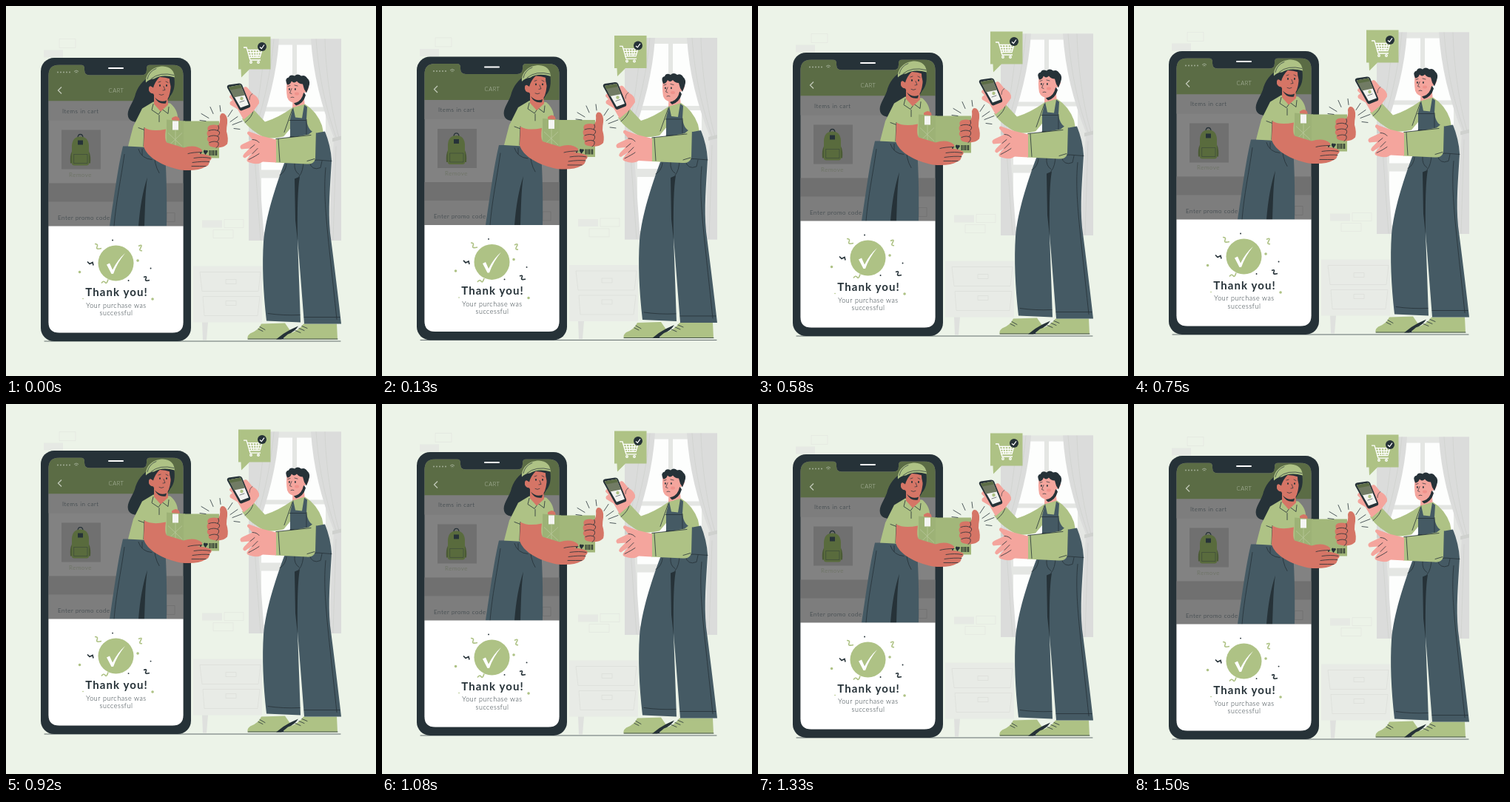
An HTML page that plays this animation: 500 px wide and 500 px high, repeating every 1540 ms.

```html
<!DOCTYPE html>
<html lang="en">
<head>
<meta charset="utf-8">
<title>Purchase complete</title>
<style>
  html, body { margin: 0; width: 100%; height: 100%; overflow: hidden; background: #ecf3e8; }
  svg { display: block; width: 100%; height: 100%; font-family: Lato, sans-serif; font-weight: 300; }
  .green { fill: #aec285; }
  .dark { fill: #263238; }
  .denim { fill: #455a64; }
  .coral { fill: #d57566; }
  .pink { fill: #f4a59d; }
  .white { fill: #fff; }
  .line { fill: none; stroke: #263238; stroke-width: .8; stroke-linecap: round; stroke-linejoin: round; }
  .faint { fill: none; stroke: #dcdfda; stroke-width: .8; }
  .pale { fill: #e6e9e4; }
  text { letter-spacing: .55px; fill: #263238; }
  .mid { text-anchor: middle; }
</style>
</head>
<body>
<svg viewBox="0 0 500 500">
  <defs>
    <clipPath id="screen">
      <path d="M72 80H101Q106 80 106 85V87Q106 94 113 94H183Q190 94 190 87V85Q190 80 195 80H225Q239.500 80 239.500 94V428Q239.500 442 225 442H72Q57.500 442 57.500 428V94Q57.500 80 72 80Z"/>
    </clipPath>
  </defs>
  <g id="scene">
    <g id="wall">
      <path class="pale" d="M51 60H77V70H51ZM265 290H292V300H265Z"/>
      <path class="faint" d="M72 45H94V57H72ZM295 289H321V300H295ZM280 303H307V314H280Z" opacity=".55"/>
    </g>

    <g id="window">
      <path fill="#e4e6e3" d="M328 45H453V317.500H328Z"/>
      <path fill="#fdfefd" d="M366 53H387V137H345V110ZM393 53H414L433 110V137H393ZM345 143H387V222H345ZM393 143H432V222H393ZM345 233H432V306H345Z"/>
      <path fill="#dbdcdb" d="M328 45H369C366 92 354 136 339 178L349 317.500H328ZM453 45H412C415 92 426 136 443 178L436 317.500H453Z"/>
      <path class="faint" style="stroke:#d0d2cf" d="M362 45C357 100 345 145 333 178M350 45C347 95 338 150 331 178M335 190L344 317M419 45C423 100 433 140 446 178M431 45C432 90 440 145 450 178M446 190L442 317"/>
      <path fill="#cfd1ce" d="M328 176L340 179V184L328 181ZM453 176L441 179V184L453 181Z"/>
    </g>

    <g id="cabinet">
      <path fill="#e8ebe6" d="M253 352H346V428H253Z"/>
      <path fill="#dfe1de" d="M265 428H273L271 452H266Z"/>
      <path class="faint" d="M262 360H344L341 386H265ZM266 393H343L340 419H268ZM297 370H311V376H297ZM297 399H311V405H297Z"/>
    </g>

    <path class="line" d="M52 453.500H452" style="stroke-width:.7"/>

    <g id="phone">
      <rect class="dark" x="47" y="70.500" width="203" height="383" rx="18"/>
      <g clip-path="url(#screen)">
        <path fill="#828282" d="M57 79H240V443H57Z"/>
        <path fill="#5b6c45" d="M57 79H240V129H57Z"/>
        <path fill="#7d7d7d" d="M57 129H240V155H57ZM57 265H240V298H57Z"/>
        <path fill="#707070" d="M57 240H240V265H57ZM75 168H128V221H75Z"/>
      </g>
      <path d="M139 84.500H158" stroke="#fff" stroke-width="2" stroke-linecap="round"/>
      <g fill="none" stroke="#a1ac95">
        <path d="M70 90H87" stroke-width="2" stroke-linecap="round" stroke-dasharray="0 4"/>
        <path d="M92 89Q95 86 98 89M93.500 90.500Q95 89 96.500 90.500M95 92V92.200"/>
        <path d="M75 110L70.500 114.500L75 119" stroke="#c0c8b7" stroke-width="1.300"/>
        <path d="M217 280H228V292H217Z" stroke="#6f6f6f" stroke-width=".7"/>
      </g>
      <text class="mid" x="149" y="117" font-size="7.500" style="fill:#b9c2ae">CART</text>
      <g font-size="8">
        <text x="76" y="145">Items in cart</text>
        <text x="70" y="289.500">Enter promo code</text>
        <text x="85" y="231" style="fill:#626b55">Remove</text>
      </g>
      <g id="backpack">
        <path class="line" d="M97 179Q97 174 100.500 174Q104 174 104 179" style="stroke-width:1.300"/>
        <path fill="#4b5b35" d="M87 213Q86 203 89 197H112Q115 203 114 213Z"/>
        <path fill="#596b3d" d="M89 213V189Q90 177 100.500 177Q111 177 112 189V213Q112 216 109 216H92Q89 216 89 213Z"/>
        <path class="line" d="M92 201H110V213H92Z" style="stroke-width:.4"/>
        <path class="dark" d="M97 182H104V188H97Z"/>
      </g>
    </g>

    <g id="courier">
      <path class="dark" d="M197 95C184 100 177 111 174 123C170 134 163 141 165 150C168 160 186 160 193 148L212 139L222 122Q230 113 227 94Z"/>
      <path class="denim" d="M158 190H214Q218 232 217 298H140C147 252 151 220 158 190Z"/>
      <path class="dark" d="M191 232C188 252 188 274 187 298H179C181 272 185 250 191 232Z"/>
      <path class="line" d="M160 201C155 237 149 262 146 298M179 194Q183 207 197 208M200 195Q200 215 207 226M184 194V202"/>
      <path class="green" d="M184 139L199 130L222 132Q234 142 232 158L219 158L216 193L165 190Q168 178 172 163Z"/>
      <path class="line" d="M187 165L186 190M199 133L197 141L206 147L211 140L219 146L220 137M207 148V157M179 165L187 168"/>
      <path class="coral" d="M200 118H218L219 134L209 143L200 133Z"/>
      <path class="dark" d="M201 124Q209 132 217 128L216 132Q206 134 201 124Z"/>
      <path class="coral" d="M196 99Q208 94 222 99Q224 111 220 123Q217 130 210 128Q202 126 199 119Q192 118 193 111Q194 107 198 110Z"/>
      <path class="dark" d="M194 97L208 96Q201 103 199 111L195 108ZM219 95H226L226 113Q221 109 221 99Z"/>
      <path class="green" d="M189 104C188 91 199 82 212 82Q227 83 228 97Q211 92 200 99Q194 99 189 104Z"/>
      <path class="line" d="M196 99Q208 89 227 94M203 85Q193 89 191 99M206 103.500L209 102.500M216 102.500L219 104M213 109L215 114L212 114.500M207 120Q210 122 213 120" style="stroke-width:.7"/>
      <path class="dark" d="M207 108a1 1.400 0 1 0 2 0a1 1.400 0 1 0-2 0M216 108a1 1.400 0 1 0 2 0a1 1.400 0 1 0-2 0"/>
    </g>

    <g id="receipt">
      <path class="white" d="M57.500 298H239.500V428Q239.500 442 225 442H72Q57.500 442 57.500 428Z"/>
      <circle class="green" cx="148.500" cy="348" r="24"/>
      <path class="white" d="M136 350L140 348L144 357Q151 343 161 334.500Q150 348 145 362.500H142.500Z"/>
      <g fill="none" stroke="#aec285" stroke-width="1.600">
        <path d="M120 322Q125 322 123 326T129 328M129 375Q132 371 134 374T138 370M179 325Q185 322 182 327T184 331"/>
        <path d="M110 346L113 349L117 347L118 351M186 367Q191 365 189 369T194 371" stroke="#263238"/>
      </g>
      <path class="line" d="M144 317h.1M195.500 355h.1M165.500 371.500h.1" style="stroke-width:1.800"/>
      <path class="line" d="M99.500 360h.1M178 344.500h.1M198 396.500h.1" style="stroke:#aec285;stroke-width:3.500"/>
      <path class="line" d="M104 396h.1" style="stroke:#aec285;stroke-width:1.600"/>
      <text class="mid" x="149.500" y="392.500" font-size="15" font-weight="700" style="letter-spacing:1.100px">Thank you!</text>
      <g class="mid" font-size="9">
        <text x="149" y="408">Your purchase was</text>
        <text x="149" y="418.500">successful</text>
      </g>
    </g>

    <g id="parcel">
      <path class="coral" d="M224 152Q230 147 234 152L235 157H224Z"/>
      <path fill="#9db276" d="M217 154L242 156V205L217 187Z"/>
      <path fill="#a2b77a" d="M240 156H288V206H240Z"/>
      <path fill="#f4f5f2" d="M225 156H233V168H225Z"/>
      <path d="M219 172L238 190M238 172L219 190M229 168V190" fill="none" stroke="#bccaa0" stroke-width=".7"/>
      <path class="dark" d="M261 196H265L264 199V202H266V203H260V202H262V199ZM267 196Q269 194 270 196Q272 194 273 197L270 201V203H269V201L267 198Z"/>
      <path d="M274.500 199H286" fill="none" stroke="#3e4a3b" stroke-width="7" stroke-dasharray="2 .7 1 .6"/>
      <path class="coral" d="M187 165Q197 171 216 167Q214 180 217 185L240 192Q256 187 265 195L265 198L259 200Q269 200 277 204Q279 207 275 210Q275 216 269 218Q259 224 236 222C212 217 190 205 186 190Z"/>
      <path class="line" d="M246 200Q253 198 265 198M254 206Q266 204 276 206M252 212Q266 210 275 211M251 217Q262 217 270 217"/>
      <path class="coral" d="M275 162Q281 160 287 162Q290 157 289 150Q290 144 295 146Q300 150 299 159Q298 164 298 170Q301 180 299 187Q292 194 279 191Q272 190 274 184Q270 181 273 177Q270 172 273 169Q271 164 275 162Z"/>
      <path class="line" d="M274 169Q282 166 288 170Q290 173 286 176M274 177Q281 174 287 177Q289 181 285 184M275 185Q282 182 287 185Q288 190 284 192M287 162Q289 166 286 169"/>
      <path class="line" d="M289 135L290 143M276 137L280 146M264 146L274 152M262 155L270 156M306 141L300 150M313 150L303 157M319 156L306 161M308 166L316 167"/>
    </g>

    <g id="bubble">
      <path class="green" d="M314 42H357.500V86H329L318 97L317.500 86H314Z"/>
      <g fill="none" stroke="#fff" stroke-width="1.300">
        <path d="M321 56.500H325L330 73.500H344M326 60H346L343 70H328M327 63.500H345M328 67H344M330 60L332 70M334 60L335 70M338 60V70M342 60L340 70"/>
        <circle cx="331" cy="76.500" r="1.300"/><circle cx="341" cy="76.500" r="1.300"/>
      </g>
      <circle class="dark" cx="346" cy="55.500" r="6"/>
      <path d="M343 56L345.300 58L349 53" fill="none" stroke="#fff" stroke-width="1.200"/>
    </g>

    <g id="customer">
      <path class="green" d="M345 430L377 429L386 442L372 451H327Q325 447 330 443Q341 439 345 430ZM402 430H447L448 451H376Q374 447 381 444Q395 440 402 430Z"/>
      <path class="dark" d="M365 451Q374 443 384 438L395 433Q390 441 381 444L375 449L376 451Z"/>
      <path class="line" d="M327 450.500H372M376 450.500H448M343 434L350 438M341 437L347 440M400 433L407 436M396 436L403 439M391 439L398 442"/>
      <path class="pink" d="M388 123L402 115L404 138L393 148L387 138Z"/>
      <path class="green" d="M387 138L404 133Q420 143 427 162L430 177L416 214L384 190L386 164L375 177Q362 180 350 179C338 172 327 165 319 153L334 140L350 157Q367 152 387 138Z"/>
      <path class="denim" d="M384 153L388 137L391 151L400 152L403 134L407 137L406 154Q408 171 420 172L431 170Q439 190 440 209C438 245 435 275 438 307Q445 360 453 430L403 430L394 315L398 428L352 426Q345 365 348 319C351 285 364 245 376 213L384 207Z"/>
      <path class="dark" d="M390 234L397 231Q393 253 394 318L391 290Z"/>
      <path class="line" d="M383 155H405M384 177H406V154M376 212Q404 206 440 210M402 209Q402 224 396 231M379 214Q378 225 370 229M410 211Q413 224 425 219L427 210M390 213Q389 224 396 228M432 219C428 260 434 300 447 424M354 416Q374 419 397 418M403 421H451"/>
      <path class="green" d="M419 166L418 207Q416 215 406 214L364 212V180L393 177L409 174Z"/>
      <path class="line" d="M387 140L376 171M368 180L370 211M334 142Q333 150 323 158M365 180L412 175M407 210L417 207"/>

      <path class="pink" d="M365 181V212L347 211Q340 216 329 212Q323 210 327 206L333 199L323 206Q318 205 322 200L329 193L318 194Q314 190 320 187L333 181L326 173Q326 168 331 171L345 176Z"/>
      <path class="line" d="M333 181Q339 181 342 185M330 193L336 188M333 200L340 193M328 208Q338 203 342 200"/>

      <path class="pink" d="M319 113Q324 106 328 113L333 119Q343 124 342 132L334 143L321 154L313 140L303 134Q301 130 306 128L302 124Q302 120 307 120Z"/>
      <path class="dark" d="M299 111Q298 108 301 107L315 105Q318 105 319 107L330 134Q331 137 328 138L318 142Q316 142 315 140Z"/>
      <path fill="#f2f3f0" d="M301 110L317 107L328 134L317 138Z"/>
      <path fill="#717b64" d="M301 110L317 107L323 121L308 124Z"/>
      <path fill="#5c6d46" d="M301 110L317 107L319 111L303 114Z"/>
      <circle class="green" cx="318.500" cy="125.500" r="2.200"/>
      <path class="line" d="M316 130.500L322 128.500M333 119Q329 121 329 127" style="stroke-width:.6"/>

      <path class="dark" d="M389 132Q399 128 402 116L405 121Q402 132 392 135Z"/>
      <path class="pink" d="M380 101H402L403 107Q409 105 409 111Q408 117 402 118Q400 128 392 131Q383 132 380 124Q378 112 380 101Z"/>
      <path class="dark" d="M380 107Q376 98 382 97Q384 92 390 95Q394 91 399 95Q404 93 407 98Q412 102 409 110L406 118L403 113L401 106Q396 106 393 102Q389 106 386 102Q384 107 380 107Z"/>
      <path class="line" d="M381 109L384 108M390 107.500L394 108.500M386 112L383.500 118L386 119M385 124Q387 123 389 124M404 110Q407 108 407 112" style="stroke-width:.7"/>
      <path class="dark" d="M382 113a.9 1.400 0 1 0 1.800 0a.9 1.400 0 1 0-1.800 0M390 113a.9 1.400 0 1 0 1.800 0a.9 1.400 0 1 0-1.800 0"/>
      <path fill="#ec8580" opacity=".6" d="M390 119a3 2 0 1 0 6 0a3 2 0 1 0-6 0"/>
    </g>
  </g>
</svg>
<script>
  const LOOP = 1540, PEAK = 750, SPEED = 0.01207, REST = 790;
  const scene = document.getElementById('scene');
  const start = performance.now();

  // Constant-speed drift: up until PEAK, then back down.
  function draw() {
    const t = (performance.now() - start) % LOOP;
    const gap = Math.abs(t - PEAK);
    const distance = Math.min(gap, LOOP - gap);
    scene.setAttribute('transform', `translate(0 ${(distance - REST) * SPEED})`);
    requestAnimationFrame(draw);
  }
  draw();
</script>
</body>
</html>
```
